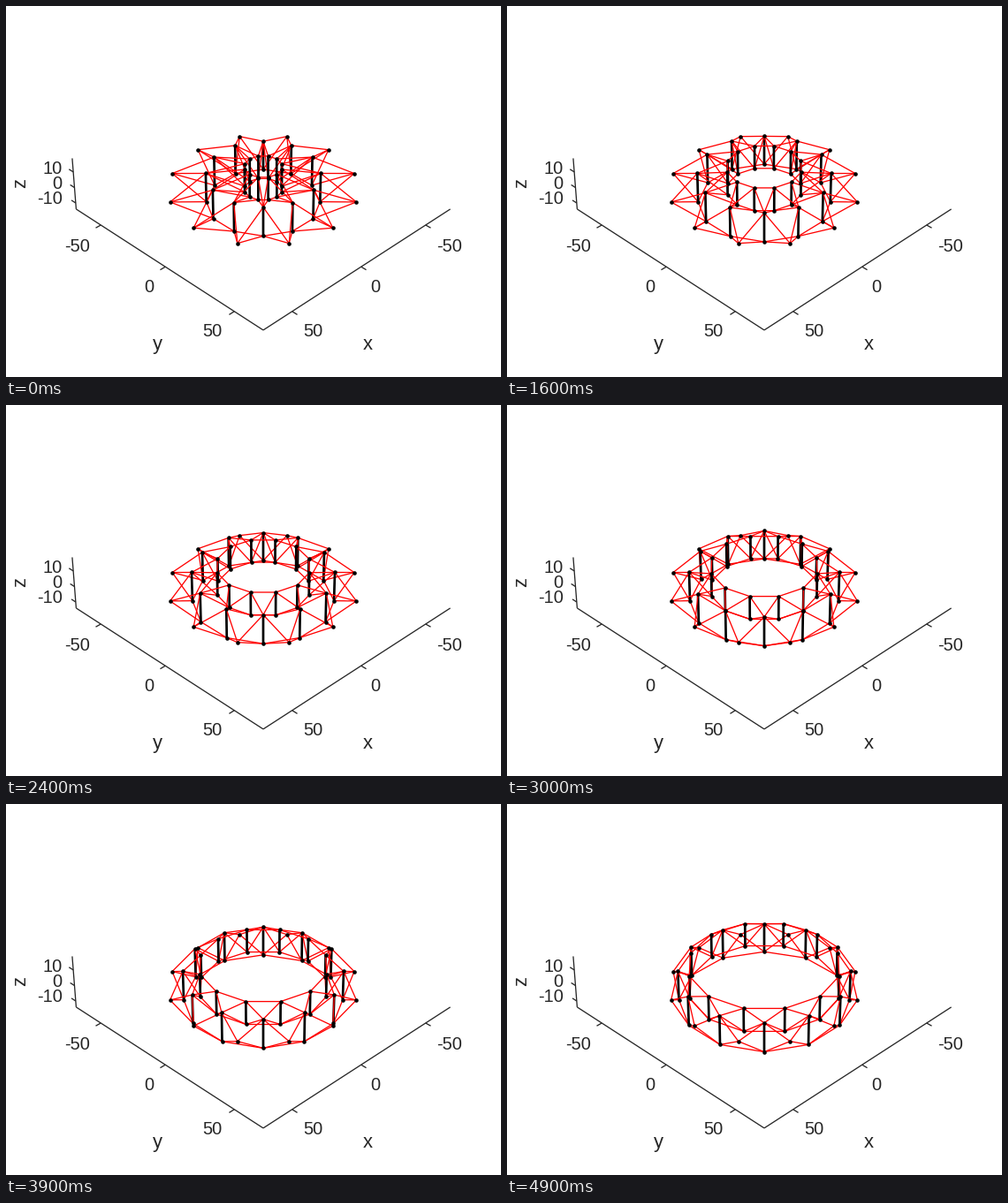
Recreate the animation shown at these times as a matplotlib script. Size 560x420 px, loop 5000 ms.

```python
import numpy as np
import matplotlib.pyplot as plt
from matplotlib.animation import FuncAnimation
from matplotlib.collections import LineCollection

WIDTH, HEIGHT, DPI = 560, 420, 80
PX = 72 / DPI                      # one pixel in points
FRAMES, INTERVAL = 50, 100

ELEV = np.radians(35.3)
SIN, COS = np.sin(ELEV), np.cos(ELEV)
SCALE, DISTANCE = 2.16, 900
CENTER = np.array([291, 201.5])
Z_MID, Z_HALF, LIMIT = 2.3, 16.3, 70
TICK = 3.5

N = 12
SPOKES = np.arange(N) * 2 * np.pi / N
HALF_STEP = np.pi / N
INK, RED, BLACK = "#262626", "#ff0000", "#000000"


def project(points):
    """Perspective view from azimuth 135; returns pixels and nearness."""
    x, y, z = np.moveaxis(np.asarray(points, float), -1, 0)
    across, toward = (y - x) / np.sqrt(2), (x + y) / np.sqrt(2)
    z = z - Z_MID
    near = toward * COS + z * SIN
    zoom = SCALE / (1 - near / DISTANCE)
    pixels = np.stack([across * zoom, (toward * SIN - z * COS) * zoom], -1)
    return pixels + CENTER, near


def ring(radius, z, offset=0.0):
    angle = SPOKES + np.pi / 4 + offset
    return np.stack([radius * np.cos(angle), radius * np.sin(angle),
                     np.full(N, z)], -1)


def join(a, b, shift=0):
    return np.stack([a, np.roll(b, -shift, axis=0)], axis=1)


def dome(progress):
    """Cable dome: fixed rim, middle struts, inner struts."""
    middle, inner = 30 + 15 * progress, 10 + 30 * progress
    rim = ring(50, 0, HALF_STEP)
    mid_top, mid_low = ring(middle, 9.1), ring(middle, -9.2)
    in_top = ring(inner, 13.4, HALF_STEP)
    in_low = ring(inner, -1.0, HALF_STEP)
    cables = [join(a, b, s)
              for a, b in ((rim, mid_top), (rim, mid_low),
                           (in_top, mid_top), (in_low, mid_top))
              for s in (0, 1)]
    cables += [join(hoop, hoop, 1) for hoop in (mid_low, in_low, in_top)]
    struts = [join(mid_low, mid_top), join(in_low, in_top)]
    nodes = np.concatenate([rim, mid_top, mid_low, in_top, in_low])
    return np.concatenate(cables), np.concatenate(struts), nodes


fig = plt.figure(figsize=(WIDTH / DPI, HEIGHT / DPI), dpi=DPI,
                 facecolor="white")
ax = fig.add_axes([0, 0, 1, 1])
ax.set_xlim(0, WIDTH)
ax.set_ylim(HEIGHT, 0)
ax.axis("off")


def label(x, baseline, text, size=20, ha="center", rotation=0):
    ax.text(x, baseline, text, fontsize=size * PX, color=INK, ha=ha,
            va="baseline", rotation=rotation, rotation_mode="anchor",
            family="Liberation Sans")


def draw_axes():
    low, high = Z_MID - Z_HALF, Z_MID + Z_HALF
    edges = [[(LIMIT, LIMIT, low), (-LIMIT, LIMIT, low)],
             [(LIMIT, LIMIT, low), (LIMIT, -LIMIT, low)],
             [(LIMIT, -LIMIT, low), (LIMIT, -LIMIT, high)]]
    for v in (-50, 0, 50):
        edges.append([(v, LIMIT, low), (v, LIMIT + TICK, low)])
        edges.append([(LIMIT, v, low), (LIMIT + TICK, v, low)])
    for z in (-10, 0, 10):
        edges.append([(LIMIT, -LIMIT, z), (LIMIT, -LIMIT - TICK, z)])
    lines, _ = project(edges)
    ax.add_collection(LineCollection(lines, colors=INK, linewidths=1.3 * PX,
                                     capstyle="butt", snap=False, zorder=1))

    for text, left, right, y in (("-50", 80.3, 501.3, 277.5),
                                 ("0", 162, 418, 324.5),
                                 ("50", 233.8, 347.3, 374.5)):
        label(left, y, text)
        label(right, y, text)
    for text, y in (("10", 189.5), ("0", 207), ("-10", 224.5)):
        label(63.5, y, text, ha="right")
    label(171.7, 389, "y", 22)
    label(409.5, 389, "x", 22)
    label(22, 201, "z", 22, rotation=90)


draw_axes()
members = LineCollection([], capstyle="butt", snap=False, zorder=2)
ax.add_collection(members)
dots, = ax.plot([], [], "o", color=BLACK, markersize=4.6 * PX,
                markeredgewidth=0, snap=False, zorder=3)


def update(frame):
    cables, struts, nodes = dome(frame / (FRAMES - 1))
    lines, near = project(np.concatenate([cables, struts]))
    order = np.argsort(near.mean(axis=1), kind="stable")
    is_strut = order >= len(cables)
    members.set_segments(lines[order])
    members.set_color(np.where(is_strut, BLACK, RED).tolist())
    members.set_linewidth(np.where(is_strut, 2.7, 1.3) * PX)
    dots.set_data(*project(nodes)[0].T)
    return members, dots


anim = FuncAnimation(fig, update, frames=FRAMES, interval=INTERVAL,
                     repeat=True, repeat_delay=0, blit=False)
plt.show()
```
